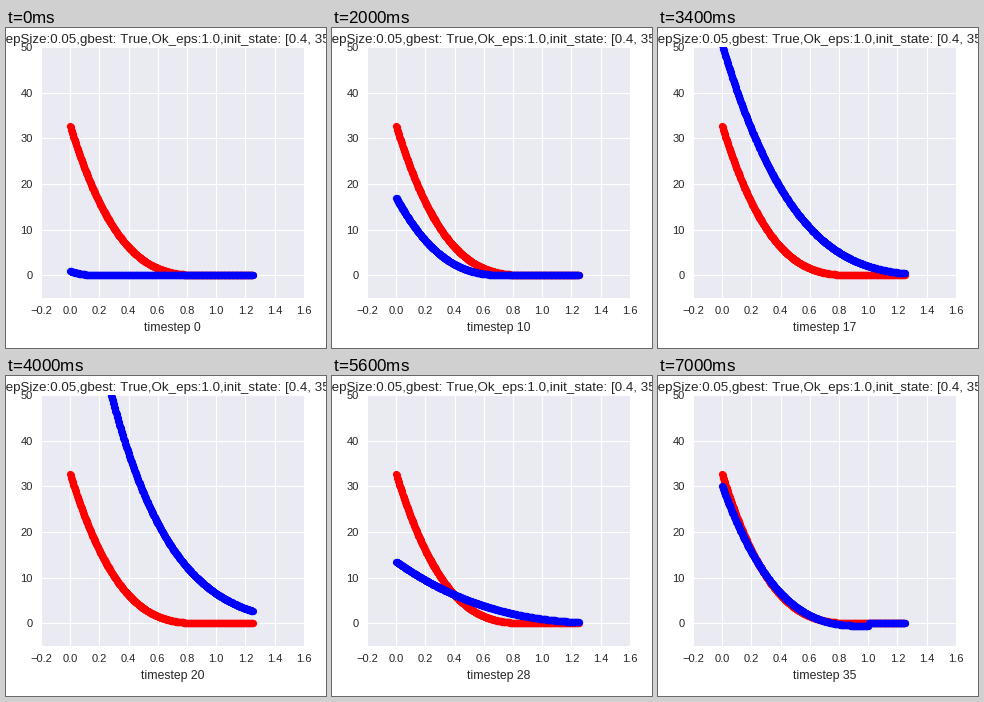
A matplotlib script for the animation above (7.2 s loop, 320 px wide and 320 px high).

```python
import numpy as np
import matplotlib.pyplot as plt
from matplotlib.animation import FuncAnimation

SIZE, DPI = 320, 80
FRAMES, INTERVAL = 36, 200
LEFT, RIGHT, TOP, BOTTOM = 35, 297.8, 19.3, 270
INK, PANEL = "0.15", "#EAEAF2"

plt.rcParams["font.family"] = "Liberation Sans"
plt.rcParams["text.color"] = INK
plt.rcParams["text.kerning_factor"] = 6

# key poses of the moving curve: start height and where it meets zero
STEPS = [0, 6, 10, 15, 20, 24, 28, 35]
HEIGHTS = [0.9, 0.5, 17, 20.1, 96, 19.4, 13.5, 30.6]
REACHES = [0.2, 0.2, 0.76, 0.85, 2.95, 1.8, 1.55, 1.02]

x = np.linspace(0, 1.25, 501)


def decay(height, reach):
    """Power-law fall to zero; taller curves bend more sharply."""
    power = 2.5 + (height / 48) ** 2
    return height * np.clip(1 - x / reach, 0, None) ** power


def moving(step):
    y = decay(np.interp(step, STEPS, HEIGHTS), np.interp(step, STEPS, REACHES))
    sag = 0.6 * max(0, step - 28) / 7
    return y - sag * (x <= 1)


fig = plt.figure(figsize=(SIZE / DPI, SIZE / DPI), dpi=DPI, facecolor="white")
ax = fig.add_axes([LEFT / SIZE, 1 - BOTTOM / SIZE,
                   (RIGHT - LEFT) / SIZE, (BOTTOM - TOP) / SIZE],
                  facecolor=PANEL)
ax.set_xlim(-0.2, 1.6)
ax.set_ylim(-5, 50)
ax.set_xticks(np.arange(-1, 9) * 0.2)
ax.set_yticks(range(0, 51, 10))
ax.xaxis.set_major_formatter("{x:.1f}")
ax.tick_params(length=0, pad=7.3, labelsize=10, labelcolor=INK)
ax.grid(color="white", linewidth=1)
ax.set_axisbelow(True)
for spine in ax.spines.values():
    spine.set_visible(False)


def dots(color, y):
    return ax.plot(x, y, "o", color=color, ms=6.5, mew=0)[0]


def put(px, py, text, size, ha):
    return fig.text(px / SIZE, 1 - py / SIZE, text, fontsize=size,
                    ha=ha, va="baseline")


dots("red", decay(32.7, 0.93))
blue = dots("blue", moving(0))

put(-13.4, 14.6, "StepSize:0.05,gbest: True,Ok_eps:1.0,init_state: [0.4, 35.0]",
    12, "left")
label = put((LEFT + RIGHT) / 2, 303, "timestep 0", 11, "center")


def update(step):
    blue.set_ydata(moving(step))
    label.set_text(f"timestep {step}")
    return blue, label


anim = FuncAnimation(fig, update, frames=FRAMES, interval=INTERVAL,
                     repeat=True, repeat_delay=0)
plt.show()
```
